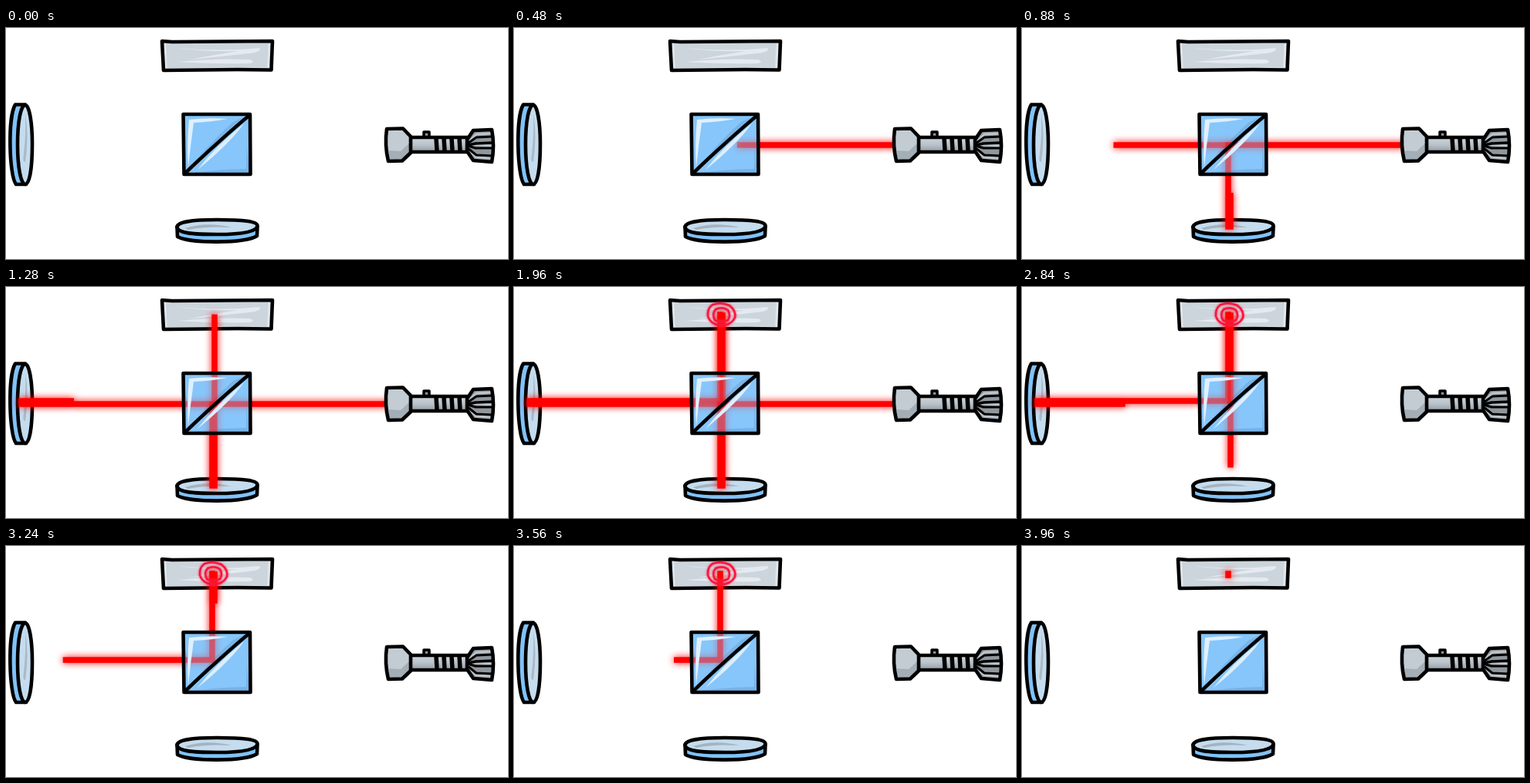
An HTML page with a canvas that plays this animation: 650 px wide and 300 px high, repeating every 4 s.

```html
<!DOCTYPE html>
<html lang="en">
<head>
<meta charset="utf-8">
<title>Interferometer</title>
<style>
  html, body { margin: 0; width: 100%; height: 100%; overflow: hidden; background: #fff; }
  canvas { display: block; width: 650px; height: 300px; }
</style>
</head>
<body>
<canvas id="stage" width="650" height="300"></canvas>
<script>
const ctx = document.getElementById('stage').getContext('2d');
const LOOP = 4000, STEP = 40;
const INK = '#000', RED = '#ff0000';

// Paths are SVG strings; an outline is optional.
function shape(d, fill, stroke, width = 4.6) {
  const p = new Path2D(d);
  if (fill) { ctx.fillStyle = fill; ctx.fill(p); }
  if (stroke) {
    ctx.strokeStyle = stroke;
    ctx.lineWidth = width;
    ctx.stroke(p);
  }
}
const line = (d, color = INK, width = 4.6) => shape(d, null, color, width);

function gradient(x0, y0, x1, y1, ...colors) {
  const g = ctx.createLinearGradient(x0, y0, x1, y1);
  colors.forEach((c, i) => g.addColorStop(i / (colors.length - 1), c));
  return g;
}

function drawScreen() {
  const box = 'M202 17 L215 18 L345 17 L343.5 54.5 L300 54 L204 55Z';
  shape(box, '#ccd4dc');
  line('M206 21 L207 51 M341 21 L339.5 50', '#dfe6ec', 3);
  shape('M222 26 Q276 31 328 26 Q332 29 322 32 Q272 38 238 41 Q268 35 300 30 Q256 31 222 26Z', '#e4eaef');
  shape('M223 44 Q270 39 316 41 Q324 44 315 46 Q268 47 223 44Z', '#e4eaef');
  line(box);
}

function drawLeftMirror() {
  shape('M12 99.5 L25 99.5 L26 203 L13 203 C4 192 2 116 12 99.5Z', '#80c2f8', INK);
  shape('M25 100 C30 100 34 122 34 150 C34 180 31 202 25 203 C19 203 15 180 15 151 C15 122 19 100 25 100Z', '#c4dcee', INK);
  shape('M25 112 Q30 138 25 174 Q21 174 23 164 Q26 138 25 112Z', '#abb9c4');
}

function drawBottomMirror() {
  shape('M221.5 258 L222 271 C238 280 309 280 325 270 L325.5 258Z', '#80c2f8', INK);
  shape('M221.5 259 C221 252 240 249 273 249 C307 249 326 251 325.5 257 C325 264 309 268 273 268 C239 268 223 266 221.5 259Z', '#c4dcee', INK);
  shape('M232 260 Q260 251 292 259 Q260 257 236 262Z', '#a6b3be');
}

const CUBE = 'M229.5 112 L316 112 L316.5 190 L230.5 190Z';

function drawCubeFill() {
  shape(CUBE, '#87c6fa');
  shape('M312 114 L294 122 Q272 142 250 167Z', '#78b4e6');
  shape('M234 189 Q280 183 311 183 L312 150 L315 189Z', '#74b3ea');
}

function drawCubeLines() {
  shape('M237 119 Q262 116 287 118 Q266 122 243 123 Q239 152 236 181 Q234 150 237 119Z', '#e0f0fd');
  shape('M248 184 Q272 153 308 124 Q290 150 248 184Z', '#dceefd');
  line(CUBE);
  line('M231.5 189 Q252 169 271 152 Q294 131 315 113.5');
}

function drawLaser() {
  shape('M541 140 L541 135 L548 135 L548 140', '#8e969e', INK, 3.5);
  shape('M523 142 L600 142 L600 161 L523 161Z', gradient(0, 141, 0, 162, '#d0d7dd', '#bac3cb', '#8e969e'), INK);

  const head = 'M493 131 L514 130.5 L524 141 L524 162 L513 172.5 L495 173 Q490 152 493 131Z';
  shape(head, '#c3ccd3');
  shape('M494 159 L511 160 L524 148 L524 162 L513 172 L495 173Z', '#a4aeb6');
  line(head);

  for (let x = 557; x < 596; x += 10) line(`M${x} 143 L${x + 1} 160`, INK, 5.5);

  const tail = 'M597 145 L605 133 L629 132 Q633 153 629 174 L605 172 L597 160Z';
  shape(tail, '#90979d');
  line('M600 147 L609 138 L628 137 M600 151 L628 153 M600 159 L609 168 L628 169', '#bcc4ca', 3);
  line('M599 149 L609 142 L630 141', INK, 3);
  line('M598 152 L608 150 L631 149', INK, 3.5);
  line('M598 153 L608 156 L631 156', INK, 3);
  line('M599 157 L609 165 L630 166', INK, 3);
  line(tail);
}

// Corners: x, y, time the light arrives, time the light ends.
const leftRay = [
  [497, 152, 0, 1966], [20, 152, 1120, 3102], [20, 148, 1120, 3102],
  [267, 148, 1735, 3695], [267, 36, 1960, 3965]
];
const downRay = [
  [267, 152, 537, 2514], [267, 258, 790, 2772], [270, 258, 790, 2772],
  [270, 37, 1285, 3325]
];

// Distance along a ray at time t; col selects arrival or end times.
function reach(ray, col, t) {
  let dist = 0;
  for (let i = 1; i < ray.length; i++) {
    const a = ray[i - 1], b = ray[i];
    const len = Math.hypot(b[0] - a[0], b[1] - a[1]);
    if (t < b[col]) return dist + len * Math.max(0, (t - a[col]) / (b[col] - a[col]));
    dist += len;
  }
  return dist;
}

function drawRay(ray, t) {
  const from = reach(ray, 3, t), to = reach(ray, 2, t);
  if (to <= from) return;
  let dist = 0;
  ctx.beginPath();
  for (let i = 1; i < ray.length; i++) {
    const [ax, ay] = ray[i - 1], [bx, by] = ray[i];
    const len = Math.hypot(bx - ax, by - ay);
    const s = Math.max(0, (from - dist) / len), e = Math.min(1, (to - dist) / len);
    if (s < e) {
      ctx.moveTo(ax + (bx - ax) * s, ay + (by - ay) * s);
      ctx.lineTo(ax + (bx - ax) * e, ay + (by - ay) * e);
    }
    dist += len;
  }
  ctx.stroke();
}

function drawBeams(t, inside) {
  ctx.save();
  const area = new Path2D();
  if (!inside) area.rect(0, 0, 650, 300);
  area.rect(229, 111, 88, 80);
  ctx.clip(area, 'evenodd');
  ctx.globalAlpha = inside ? 0.42 : 1;
  ctx.strokeStyle = ctx.shadowColor = RED;
  ctx.lineCap = 'square';
  ctx.lineWidth = 7.5;
  ctx.shadowBlur = 10;
  drawRay(leftRay, t);
  drawRay(downRay, t);
  ctx.restore();
}

function drawRings() {
  ctx.save();
  ctx.shadowColor = '#ff3355';
  ctx.shadowBlur = 3;
  line('M257 23 Q268 19 279 24 Q288 31 286 40 Q281 50 267 50 Q254 48 251 38 Q250 28 257 23Z', '#fa143c', 2.6);
  line('M261 29 Q270 25 277 30 Q281 37 277 43 Q268 47 260 43 Q256 35 261 29Z', '#fa143c', 2.6);
  ctx.restore();
}

function draw(t) {
  ctx.fillStyle = '#fff';
  ctx.fillRect(0, 0, 650, 300);
  ctx.lineCap = ctx.lineJoin = 'round';
  drawScreen();
  drawLeftMirror();
  drawBottomMirror();
  drawCubeFill();
  drawBeams(t, true);
  drawBeams(t, false);
  drawCubeLines();
  if (t >= 1960 && t < 3960) drawRings();
  drawLaser();
}

const start = performance.now();
function tick() {
  const t = (performance.now() - start) % LOOP;
  draw(Math.floor(t / STEP) * STEP);
  requestAnimationFrame(tick);
}
tick();
</script>
</body>
</html>
```
